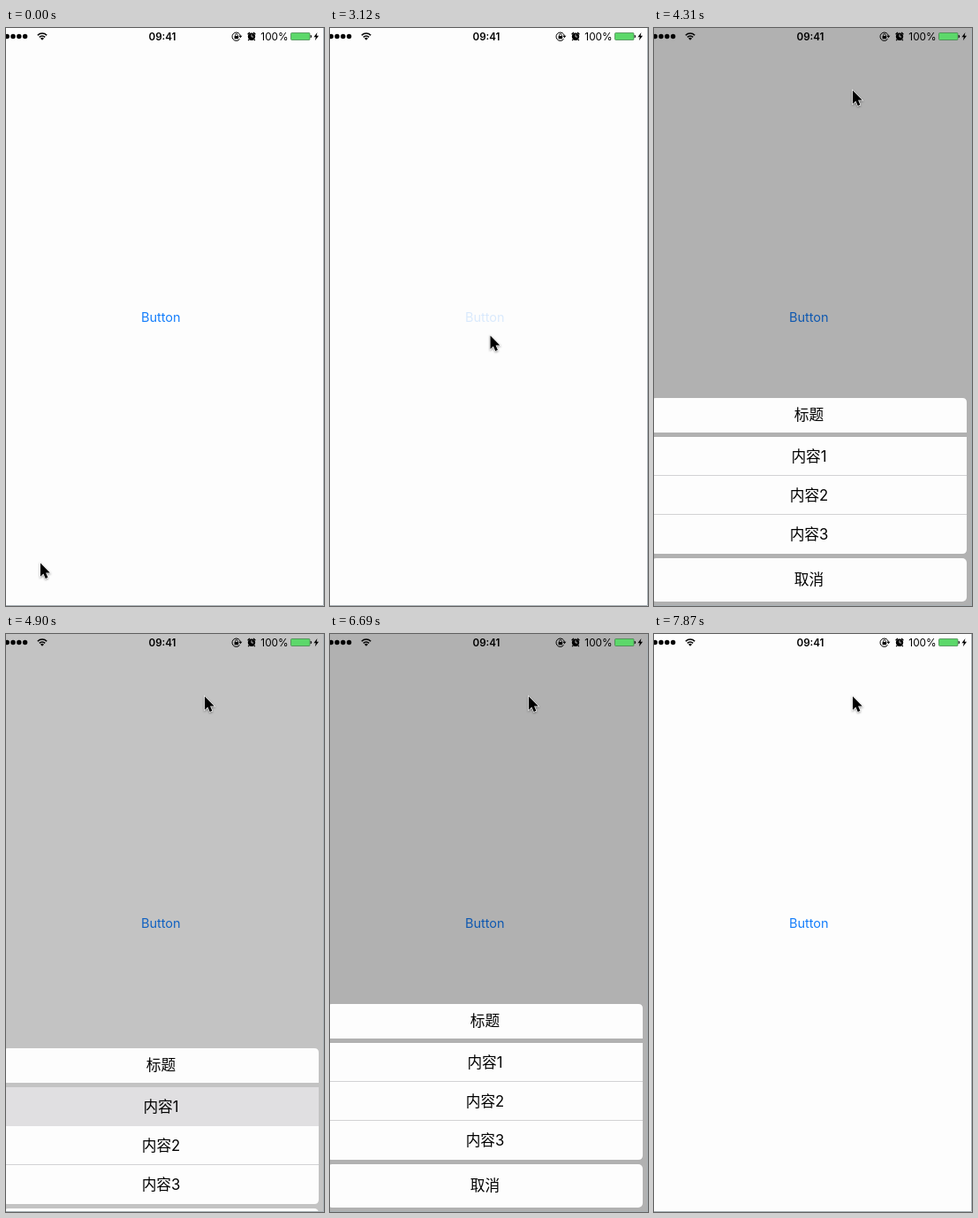
An HTML page for the animation above (8 s loop, 360 by 653 pixels).

```html
<!DOCTYPE html>
<html lang="zh-CN">
<head>
<meta charset="utf-8">
<title>Action sheet</title>
<style>
  html, body { margin: 0; width: 100%; height: 100%; overflow: hidden; background: #fdfdfd; }
  svg { display: block; }
  text { font-family: Inter, "Noto Sans CJK SC", "Noto Sans CJK", sans-serif; text-anchor: middle; }
  #sheet text { font-size: 16.7px; }
  .panel { fill: #fdfdfd; }
  .line { fill: none; stroke: #000; }
</style>
</head>
<body>
<svg width="360" height="653" viewBox="0 0 360 653">
  <rect width="360" height="653" fill="#fdfdfd"/>
  <text id="button" x="175.3" y="331.5" font-size="14.5" fill="#157efb">Button</text>
  <rect id="dim" width="360" height="653"/>

  <g id="sheet">
    <path class="panel" d="M-3 457v-34q0-5 5-5h347q5 0 5 5v34z"/>
    <path class="panel" d="M-3 462h357v127q0 5-5 5H2q-5 0-5-5z"/>
    <rect class="panel" x="-3" y="599" width="357" height="49" rx="5"/>
    <path d="M0 505.5h354M0 549.5h354" stroke="#d2d2d4"/>
    <rect id="highlight" y="462" width="354" height="44" fill="#e0dfe1"/>
    <text x="175.5" y="443">标题</text>
    <text x="175.5" y="490">内容1</text>
    <text x="175.5" y="534">内容2</text>
    <text x="175.5" y="578">内容3</text>
    <text x="175.5" y="629">取消</text>
  </g>

  <g id="status">
    <path class="line" d="M1.2 9.5h27.2" stroke-width="5.4" stroke-linecap="round" stroke-dasharray="0 6.8"/>
    <path class="line" d="M35.8 8.2a7.4 7.4 0 0 1 10.4 0M37.8 10.4a4.5 4.5 0 0 1 6.4 0" stroke-width="1.5"/>
    <path d="M41 13.8l-2-2.1a2.8 2.8 0 0 1 4 0z"/>
    <text x="177" y="13.8" font-size="11.6" font-weight="600">09:41</text>

    <path class="line" d="M264.6 12.4a4.7 4.7 0 1 1 .8-3.2" stroke-width="1"/>
    <path d="M263.4 8.8h4l-2 2.4zM258.6 9h4.6v3.2h-4.6z"/>
    <path class="line" d="M259.5 9v-.9a1.4 1.4 0 0 1 2.8 0V9" stroke-width=".8"/>

    <circle cx="278" cy="9.8" r="4.2"/>
    <path class="line" d="M273.6 7.2l2.3-2.1M282.4 7.2l-2.3-2.1M275.2 13l-1 1.2M280.8 13l1 1.2" stroke-width="1.3"/>
    <path d="M278 7.2v2.8h2.2" fill="none" stroke="#e4e4e4" stroke-width=".8"/>

    <text x="304" y="13.8" font-size="11.8">100%</text>
    <rect x="322.5" y="5.5" width="21.5" height="8" rx="1" fill="#5cd86a" stroke="#3d7d45" stroke-width=".7"/>
    <path d="M345 8q1.5 1.5 0 3z" stroke="#000" stroke-width=".6"/>
    <path d="M352.4 5l-4 5.2h2.4l-1 4 4.2-5.4h-2.4z"/>
  </g>

  <path d="M359.5 0v652.5H0" fill="none" stroke="#a9b1b6"/>
  <path id="cursor" d="M0 0v15.2l3.4-3.2 2.4 5.4 2.6-1.1-2.3-5.2h4.7z"
        stroke="#fff" stroke-width="1.3" paint-order="stroke"
        style="filter: drop-shadow(0 1px 1px rgba(0,0,0,.4))"/>
</svg>
<script>
const LOOP = 8000;
const $ = id => document.getElementById(id);

const CLOSED = { drop: 240, dim: 0, tint: 1, mark: 0 };
const PRESSED = { ...CLOSED, tint: .15 };
const RISING = { drop: 147, dim: .095, tint: .5, mark: 0 };
const SETTLED = { drop: 0, dim: .3, tint: .9, mark: 0 };
const OPEN = { ...SETTLED, tint: 1 };
const LEAVING = { drop: 50, dim: .23, tint: 1, mark: 0 };
const CHOSEN = { ...LEAVING, mark: 1 };

// [start in ms, value]; each value holds until the next one
const poses = [
  [0, CLOSED], [3120, PRESSED], [3270, RISING], [3420, SETTLED], [3570, OPEN],
  [4900, CHOSEN], [5050, CLOSED], [5650, PRESSED], [5800, RISING],
  [5950, SETTLED], [6100, OPEN], [7720, LEAVING], [7870, CLOSED]
];
const pointer = [
  [0, [39, 604.5]], [150, [20, 624]], [300, [-40, 640]], [3120, [181.5, 347.5]],
  [3420, [189, 210]], [3570, [200, 72]], [3710, [214.5, 70.5]],
  [3860, [218, 70.5]], [4160, [222.5, 70.5]], [4310, [225, 70.5]]
];
const valueAt = (track, t) => track.findLast(([start]) => start <= t)[1];

function draw(now) {
  const t = now % LOOP;
  const pose = valueAt(poses, t);
  $('sheet').setAttribute('transform', `translate(0 ${pose.drop})`);
  $('dim').setAttribute('opacity', pose.dim);
  $('button').setAttribute('opacity', pose.tint);
  $('highlight').setAttribute('opacity', pose.mark);
  $('cursor').setAttribute('transform', `translate(${valueAt(pointer, t)})`);
  requestAnimationFrame(draw);
}
draw(performance.now());
</script>
</body>
</html>
```
